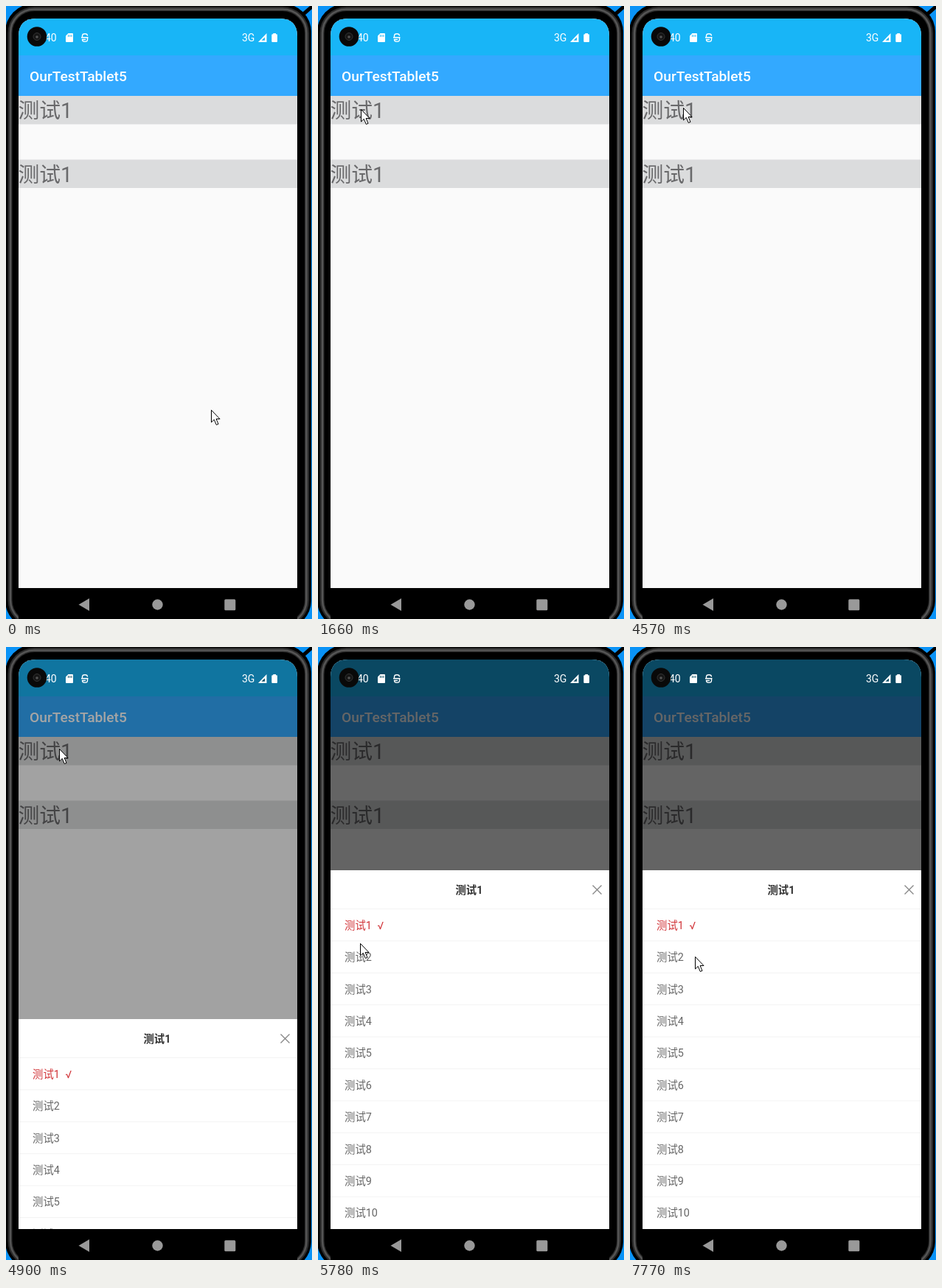
Animation of 415 by 832 pixels, one loop 8 s. Source, as an HTML page:

```html
<!DOCTYPE html>
<html lang="zh-CN">
<head>
<meta charset="utf-8">
<title>Bottom sheet demo</title>
<style>
  html, body { margin: 0; width: 100%; height: 100%; overflow: hidden; background: #0a93f7; }
  svg { display: block; width: 415px; height: 832px; }
  text { font-family: Roboto, "Noto Sans CJK SC", "Noto Sans CJK", sans-serif; }
  .field { font-size: 28.8px; fill: #69696b; }
  .item { font-size: 14.4px; fill: #666; }
  .item.on { fill: #d13438; }
  .status { font-size: 14px; fill: #fff; }
</style>
</head>
<body>
<svg viewBox="0 0 415 832">
  <defs>
    <clipPath id="screen"><path d="M17 790V41Q17 17 41 17H371Q395 17 395 41V790Z"/></clipPath>
  </defs>

  <!-- phone body -->
  <path d="M401 13L417 -1" stroke="#000" stroke-width="5"/>
  <rect x="-1" y="-3" width="415" height="848" rx="38"/>
  <g fill="none">
    <rect x="5.5" y="4" width="402.5" height="835" rx="33" stroke="#2b2b2b" stroke-width="6"/>
    <rect x="6" y="4.5" width="401.5" height="834" rx="32" stroke="#555" stroke-width="2.5"/>
  </g>
  <rect x="10" y="9" width="393" height="826" rx="29"/>

  <g clip-path="url(#screen)">
    <rect x="17" y="17" width="378" height="773" fill="#fafafa"/>
    <rect x="17" y="17" width="378" height="50" fill="#18b5f7"/>
    <rect x="17" y="67" width="378" height="55" fill="#33a9ff"/>
    <text x="32" y="102" font-size="19.2" font-weight="500" fill="#fff">OurTestTablet5</text>
    <rect x="17" y="122" width="378" height="38.5" fill="#dbdcdd"/>
    <rect x="17" y="208.5" width="378" height="38.5" fill="#dbdcdd"/>
    <text class="field" x="16.5" y="152">测试1</text>
    <text class="field" x="16.5" y="239">测试1</text>
    <rect id="dim" x="17" y="17" width="378" height="773" opacity="0"/>
    <g id="sheet" visibility="hidden">
      <rect x="17" y="303" width="378" height="487" fill="#fff"/>
      <text x="205" y="334.5" text-anchor="middle" font-size="14.4" font-weight="700" fill="#333">测试1</text>
      <path d="M372.5 323.5L384.5 335.5M384.5 323.5L372.5 335.5" stroke="#888" stroke-width="1.4"/>
      <g id="rows"></g>
    </g>
  </g>

  <!-- status bar -->
  <text class="status" x="53" y="48.2">40</text>
  <text class="status" x="320" y="48.2">3G</text>
  <g fill="#fff">
    <path d="M84.5 37H90Q91 37 91 38V48Q91 49 90 49H82Q81 49 81 48V40.5Z"/>
    <path id="slits" d="M84.5 39V42M86.7 39V42M88.9 39V42" stroke="#18b5f7" stroke-width=".9"/>
    <path d="M353.5 37V49H342Z"/>
    <path id="notch" d="M351 42.5V46.8H346.5Z" fill="#18b5f7"/>
    <path d="M362.3 37H366V38.3H367Q368 38.3 368 39.3V48Q368 49 367 49H361.3Q360.3 49 360.3 48V39.3Q360.3 38.3 361.3 38.3H362.3Z"/>
  </g>
  <path d="M111.5 42.8H103.5V40.5Q103.5 37.8 107 37.8T110.5 40.5M102 42.8H110.5V45.5Q110.5 48.4 107 48.4T103.5 45.5H108" fill="none" stroke="#fff" stroke-width="1.4"/>

  <!-- camera -->
  <circle cx="42" cy="41.5" r="13.3" fill="#090909"/>
  <circle cx="42" cy="41.5" r="5" fill="#161616" stroke="#333"/>
  <circle cx="42" cy="42" r="1.8" fill="#555"/>

  <!-- navigation -->
  <rect x="17" y="790" width="378" height="42"/>
  <g fill="#999">
    <path d="M98.5 812.5L113 804V821Z"/>
    <circle cx="205.5" cy="812.5" r="7.2"/>
    <rect x="296.3" y="805.3" width="15" height="15" rx="1.5"/>
  </g>

  <path id="cursor" d="M.5 .5V17L4.3 13.4 7.3 20.5 10 19.4 7.1 12.5H12Z" fill="#fff" stroke="#000"/>
</svg>
<script>
const LOOP = 8000, STEP = 68.2;
const OPEN = 4900, SHEET_STEP = 80, SHEET_HEIGHT = 487;
const $ = id => document.getElementById(id);

// Pointer path: time, x, y
const path = [
  [0, 278, 548], [800, 75, 182], [1000, 90, 154], [1190, 52, 127], [1390, 31, 143],
  [1630, 58, 140], [1670, 58, 140], [1800, 88, 136], [2080, 24, 150], [2350, 70, 203],
  [2450, 62, 219], [2620, 91, 216], [2760, 60, 206], [2900, 24, 228], [3030, 44, 253],
  [3130, 63, 233], [3290, 64, 233], [3450, 86, 264], [3620, 118, 237], [4110, 80, 145],
  [4340, 72, 126], [4450, 60, 133], [4555, 72, 138], [5000, 72, 138], [5520, 62, 390],
  [5720, 57, 402], [5780, 57, 402], [6050, 72, 424], [6200, 84, 400], [6320, 68, 375],
  [6460, 54, 394], [6750, 72, 429], [6900, 92, 408], [7030, 74, 381], [7150, 58, 401],
  [7280, 63, 425], [7410, 63, 425], [7530, 70, 429], [7700, 88, 420], [LOOP, 88, 420]
];

// Slope is zero at turning points, so curves never overshoot.
function slope(i, axis) {
  const a = path[i - 1], b = path[i], c = path[i + 1];
  if (!a || !c) return 0;
  const before = (b[axis] - a[axis]) / (b[0] - a[0]);
  const after = (c[axis] - b[axis]) / (c[0] - b[0]);
  return before * after <= 0 ? 0 : 2 * before * after / (before + after);
}

function position(t, axis) {
  let i = 0;
  while (path[i + 1][0] <= t) i++;
  const a = path[i], b = path[i + 1], span = b[0] - a[0], u = (t - a[0]) / span;
  const ease = u * u * (3 - 2 * u);
  return a[axis] + (b[axis] - a[axis]) * ease +
    span * u * (1 - u) * (slope(i, axis) * (1 - u) - slope(i + 1, axis) * u);
}

function buildRows() {
  let html = '';
  for (let i = 0; i < 10; i++) {
    const y = 355.5 + i * 43.4;
    html += `<path d="M17 ${y}H395" stroke="#f3f3f3"/>` +
      `<text class="item${i ? '' : ' on'}" x="36" y="${y + 27.3}">测试${i + 1}</text>`;
    if (!i) html += `<text class="item on" x="80.5" y="${y + 27.3}">√</text>`;
  }
  $('rows').innerHTML = html;
}

function drawSheet(t) {
  const shown = t >= OPEN;
  const elapsed = Math.floor((t - OPEN) / SHEET_STEP) * SHEET_STEP;
  const u = Math.min(1, (elapsed + 89) / 250);
  const rest = shown ? (1 - u) ** 2 : 1;
  $('sheet').setAttribute('visibility', shown ? 'visible' : 'hidden');
  $('sheet').setAttribute('transform', `translate(0 ${Math.round(rest * SHEET_HEIGHT)})`);
  $('dim').setAttribute('opacity', 0.6 * (1 - rest));
  const bar = shown ? '#004a63' : '#18b5f7';
  $('slits').setAttribute('stroke', bar);
  $('notch').setAttribute('fill', bar);
}

function draw(t) {
  const held = Math.floor(t / STEP) * STEP;
  const [x, y] = [1, 2].map(axis => Math.round(position(held, axis)));
  $('cursor').setAttribute('transform', `translate(${x} ${y})`);
  drawSheet(t);
}

buildRows();
draw(0);
const start = performance.now();
requestAnimationFrame(function tick() {
  draw((performance.now() - start) % LOOP);
  requestAnimationFrame(tick);
});
</script>
</body>
</html>
```
